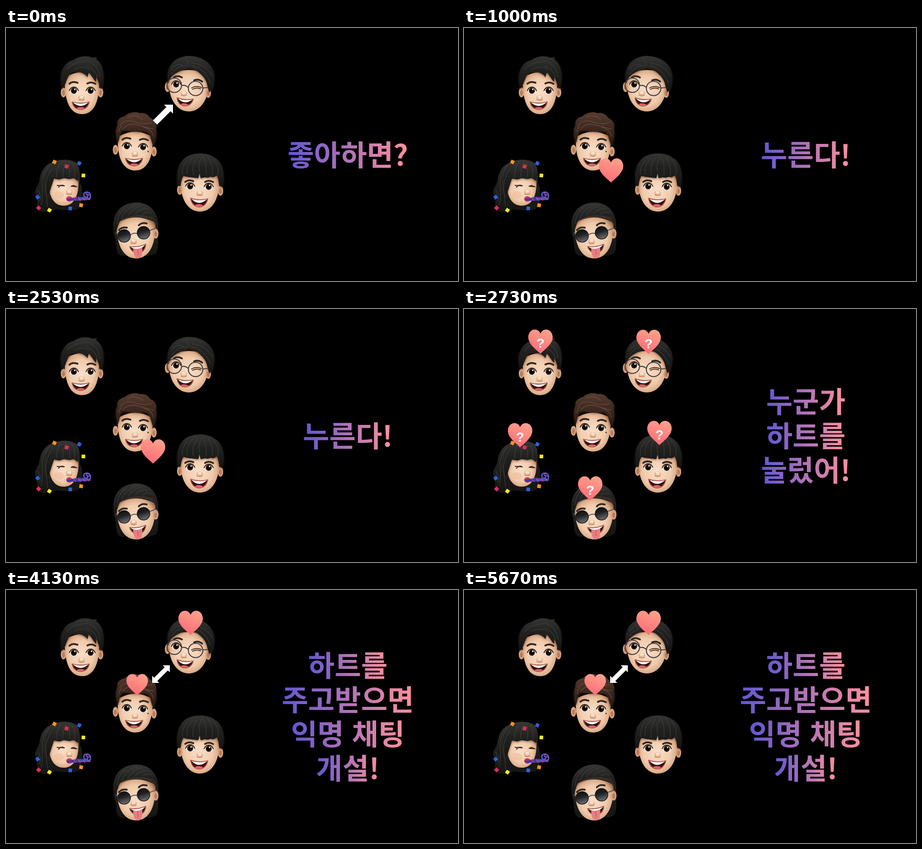
An HTML page that plays this animation: 999 px wide and 561 px high, repeating every 5740 ms.

```html
<!DOCTYPE html>
<html lang="ko">
<head>
<meta charset="utf-8">
<style>
html, body { margin: 0; width: 100%; height: 100%; overflow: hidden; background: #000; }
svg { display: block; width: 999px; height: 561px; }
.title { font: 900 63.5px "Noto Sans CJK KR", "Noto Sans CJK", sans-serif; text-anchor: middle; fill: url(#title); }
.mark { font: 700 30px "Liberation Sans", sans-serif; text-anchor: middle; fill: #fff; }
.fringe { filter: drop-shadow(0 2px 2px #6b3f2aa0); }
.line { fill: none; stroke-linecap: round; stroke-linejoin: round; }
</style>
</head>
<body>
<svg viewBox="0 0 999 561">
  <defs>
    <linearGradient id="title"><stop stop-color="#6156d2"/><stop offset="1" stop-color="#ff909c"/></linearGradient>
    <linearGradient id="heart" x1=".75" y1="0" x2=".35" y2="1"><stop stop-color="#ffa28c"/><stop offset="1" stop-color="#fd6a76"/></linearGradient>
    <radialGradient id="skin" cx=".48" cy=".5" r=".58"><stop stop-color="#f9dfc9"/><stop offset=".6" stop-color="#f0cbac"/><stop offset=".85" stop-color="#dbab87"/><stop offset="1" stop-color="#a87856"/></radialGradient>
    <linearGradient id="black" x2="0" y2="1"><stop stop-color="#353534"/><stop offset=".4" stop-color="#212120"/><stop offset="1" stop-color="#151514"/></linearGradient>
    <linearGradient id="brown" x2="0" y2="1"><stop stop-color="#563c30"/><stop offset=".5" stop-color="#3c281f"/><stop offset="1" stop-color="#251812"/></linearGradient>
    <linearGradient id="lens" x2=".3" y2="1"><stop stop-color="#0b0b0c"/><stop offset=".5" stop-color="#202123"/><stop offset="1" stop-color="#65676a"/></linearGradient>
  </defs>
  <g id="faces"></g>
  <g id="scenes"></g>
</svg>
<script>
const at = (x, y, body, turn = 0) => `<g transform="translate(${x} ${y}) rotate(${turn})">${body}</g>`;
const shape = (d, fill, cls = '') => `<path d="${d}" fill="${fill}" class="${cls}"/>`;
const line = (d, color, width) => `<path d="${d}" class="line" stroke="${color}" stroke-width="${width}"/>`;
const oval = (x, y, rx, ry, fill) => `<ellipse cx="${x}" cy="${y}" rx="${rx}" ry="${ry}" fill="${fill}"/>`;

const skin = (l, r, top, chin) => {
  const c = (l + r) / 2;
  return shape(`M${l} ${top}C${l - 2} ${chin - 20} ${c - 22} ${chin} ${c} ${chin}C${c + 22} ${chin} ${r + 2} ${chin - 20} ${r} ${top}Q${c} ${top - 24} ${l} ${top}Z`, 'url(#skin)');
};
const ear = (x, y) => oval(x, y, 6, 11, '#d6a27e') + oval(x, y + 1, 3, 6, '#b67b59');
const eye = (x, y) => at(x, y,
  oval(0, 0, 9.5, 7.5, '#fffaf3') + oval(0, 0, 6.8, 7, '#3a2417') + oval(0, 0, 4.6, 5, '#090706') +
  oval(2, -3, 1.7, 1.7, '#fff') + line('M-10 0Q-7 -8 0 -8T10 0', '#24170f', 2));
const brow = (x, y, turn, color = '#302822') => at(x, y, line('M-9 2Q-1 -4 9 1', color, 4), turn);
const nose = (x, y) => at(x, y,
  oval(0, 0, 7.5, 6, '#e4b591') + oval(0, -2, 4.5, 3.5, '#f9dfc9') + line('M-6 4Q0 7 6 4', '#bd8460', 1.6));
const mouth = (x, y, w, h, turn = 0, lip = '#a8604c') => at(x, y,
  `<path d="M${-w} 0Q0 ${.3 * h} ${w} 0C${.8 * w} ${1.33 * h} ${-.8 * w} ${1.33 * h} ${-w} 0Z" fill="#35110f" stroke="${lip}" stroke-width="2" stroke-linejoin="round"/>` +
  shape(`M${-.9 * w} ${.08 * h}Q0 ${.35 * h} ${.9 * w} ${.08 * h}Q0 ${.95 * h} ${-.9 * w} ${.08 * h}Z`, '#fff') +
  oval(0, .82 * h, .45 * w, .16 * h, '#d9636a'), turn);
const strands = (d, color = '#454543') => `<g opacity=".6">${line(d, color, 1.6)}</g>`;

const spiky = skin(130, 206, 110, 191) + ear(127, 143) + ear(209, 143) +
  shape('M125 135C121 120 119 98 128 87C134 76 142 73 150 71C160 63 178 60 190 66L201 65L198 69C207 74 213 84 214 95C217 110 214 128 210 136L206 125L200 108L199 120C194 114 188 104 183 98L180 109C174 100 162 96 146 96C138 103 134 116 131 124Z', 'url(#black)', 'fringe') +
  strands('M134 92Q150 74 184 74M150 92Q170 82 184 92M185 76Q204 84 208 110M178 84Q196 92 202 108') +
  brow(149, 121, -4) + brow(189, 122, 6) + eye(150, 139) + eye(187, 139) + nose(167, 155) + mouth(165, 164, 19, 17);

const glasses = skin(359, 449, 105, 185) + ear(357, 131) + ear(447, 144) +
  shape('M358 112C355 85 372 64 402 62C440 62 462 85 460 112C459 128 455 140 449 142L445 128C443 110 425 94 405 87C392 92 375 98 364 110L358 124Z', 'url(#black)', 'fringe') +
  strands('M404 84Q400 70 396 66M400 84Q380 82 366 102M392 84Q378 74 366 92M410 84Q438 88 452 122M412 78Q440 80 456 106') +
  brow(380, 108, 4) + brow(425, 116, 12) + eye(376, 125) +
  line('M410 133Q420 127 432 132M412 136Q421 131 430 135', '#4a2c1d', 2) + nose(393, 145) +
  mouth(396, 156, 18, 17, 5) +
  line('M388 127a16 16 0 1 0-32 0a16 16 0 1 0 32 0M435 134a16 16 0 1 0-32 0a16 16 0 1 0 32 0M388 128Q396 125 403 132M435 133L446 132', '#3e3b41', 2.2) +
  line('M361 117Q369 110 379 114M408 124Q416 117 426 121', '#aaa6ad', .8);

const quiff = skin(247, 324, 242, 316) + ear(242, 270) + ear(327, 274) +
  shape('M247 256C243 238 241 225 247 214C244 206 252 197 262 196C270 188 284 184 296 189C306 187 315 193 318 199C328 203 334 212 331 222C334 235 331 250 325 261L319 242C318 230 308 226 300 229C285 233 265 222 255 228C251 236 251 246 247 256Z', 'url(#brown)', 'fringe') +
  strands('M252 216Q264 201 284 208T322 210M258 224Q270 208 296 216T326 224M270 198Q284 190 302 202M250 230Q250 222 256 218M304 220Q322 224 326 240', '#7b5949') +
  brow(266, 245, -4) + brow(305, 247, 6) + eye(267, 262) + eye(303, 264) + nose(285, 279) +
  mouth(283, 289, 19, 17) + oval(314, 274, 1.4, 1.4, '#2a1912');

const bowl = skin(385, 472, 326, 407) + ear(384, 359) + ear(474, 361) +
  brow(405, 339, -2) + brow(449, 340, 4) +
  shape('M381 350C376 325 379 300 397 287C412 277 442 274 460 287C480 297 485 325 477 353L471 348C470 340 470 335 466 327L459 331L452 330L446 332L440 331L430 333L428 322L425 333L400 330L392 328C388 335 387 342 386 350Z', 'url(#black)', 'fringe') +
  strands('M428 318Q424 298 434 284M414 326Q410 302 424 286M400 324Q398 302 414 288M442 326Q444 300 436 286M456 326Q458 302 446 286M468 326Q472 304 458 292M390 324Q388 308 400 294') +
  eye(407, 351) + eye(448, 352) + nose(428, 366) + mouth(427, 378, 19, 19, 2, '#c1534f');

const confetti = [
  [107, 297, '#f79420', 25], [162, 300, '#2d62d8', 30], [134, 307, '#e42d50', 20],
  [171, 327, '#f8ec20', 5], [70, 375, '#2d62d8', -30], [72, 399, '#df2f5c', 45],
  [96, 404, '#f8ec20', 35], [142, 400, '#2d62d8', 5], [166, 393, '#f79420', 10]
].map(([x, y, color, turn]) => at(x, y, `<rect x="-4" y="-4" width="8" height="8" fill="${color}"/>`, turn)).join('');

const party =
  shape('M104 297C125 288 150 292 158 302C166 318 160 332 164 345C172 362 168 380 165 395C160 408 130 404 110 402C95 408 80 410 73 404C64 396 72 385 66 372C60 358 72 350 74 338C76 320 84 304 104 297Z', 'url(#black)') +
  skin(95, 160, 335, 394) +
  shape('M93 374C82 352 84 310 108 297C130 290 152 294 160 312C163 325 161 338 159 339L150 333L140 335L128 333L118 336L106 334C102 346 97 362 93 374Z', 'url(#black)', 'fringe') +
  strands('M96 306Q78 326 80 348T78 392M100 314Q86 336 88 358T92 396M112 330Q110 312 122 298M126 330Q124 312 132 298M140 330Q142 312 138 298M152 330Q154 314 146 300M70 360Q80 372 74 384') +
  line('M113 349L129 350M116 353Q122 346 129 350M144 351L157 352M144 351Q150 347 155 352', '#3a2118', 2) +
  nose(140, 364) + oval(117, 370, 11, 8, '#eeb99a80') + oval(140, 379, 7, 6, '#c9344c') +
  shape('M134 379L160 374L186 376L187 381L160 383L136 383Z', '#4437a5') +
  line('M161 379L185 379Q190 367 180 364Q171 364 172 371Q174 378 180 374Q183 369 178 369', '#4b57c4', 3.4) +
  line('M150 377l4 5M160 376l4 6M170 376l4 6M180 376l4 5M187 371l-4 -1M179 364l-1 3', '#dc3d70', 1.8) + confetti;

const lens = (x, y) => `<circle cx="${x}" cy="${y}" r="14" fill="url(#lens)" stroke="#171719" stroke-width="1.5"/>`;
const slick =
  shape('M238 440C236 410 254 388 288 387C318 387 336 408 336 440C337 470 338 492 331 500L318 505L255 505C240 500 246 480 240 462Z', 'url(#black)') +
  skin(245, 330, 432, 511) + ear(331, 456) +
  shape('M240 459C234 415 254 389 288 388C320 388 338 412 334 447C330 436 327 428 321 420C300 412 268 415 252 428C247 436 246 448 240 459Z', 'url(#black)', 'fringe') +
  strands('M256 422Q264 400 290 392M270 416Q278 400 300 394M286 413Q292 402 312 400M302 413Q310 406 322 410M246 434Q246 412 264 398M322 418Q330 426 331 438') +
  brow(258, 444, -14) + brow(302, 434, -10) + nose(282, 473) +
  mouth(291, 482, 18, 17, -8) +
  shape('M281 488Q291 492 301 486C302 500 300 511 292 511C284 511 281 500 281 488Z', '#e87c82') + line('M291 491L292 503', '#bd5560', 1.4) +
  line('M275 459Q282 453 290 456M317 449L331 444M247 458L243 454', '#55565a', 2) + lens(261, 461) + lens(304, 454);

const heart = (x, y, mark = '', size = 1) => at(x, y,
  `<path transform="scale(${size})" fill="url(#heart)" d="M0 27C-8 18 -27 6 -27 -10C-27 -20 -20 -27 -12.5 -27C-6 -27 -2 -23 0 -18C2 -23 6 -27 12.5 -27C20 -27 27 -20 27 -10C27 6 8 18 0 27Z"/>` +
  (mark && `<text class="mark" y="13.5">${mark}</text>`));
const title = (...rows) => rows.map((row, i) =>
  `<text class="title" x="755.5" y="${305 + 76 * (i - (rows.length - 1) / 2)}">${row}</text>`).join('');
const arrow = at(369, 170, shape('M0 0L-14 -14V-6.5H-56V6.5H-14V14Z', '#fff'), -45);
const twoWay = at(362, 167, shape('M0 0L-11 -11V-5H-44V-11L-55 0L-44 11V5H-11V11Z', '#fff'), -45);

const scenes = [
  [0, arrow + title('좋아하면?')],
  [1000, heart(325, 316) + title('누른다!')],
  [2730, [[169, 72.5], [408, 73], [124, 280], [432, 275], [279, 398]].map(([x, y]) => heart(x, y, '?')).join('') +
    title('누군가', '하트를', '눌렀어!')],
  [4130, heart(408, 73) + heart(290, 210, '', .88) + twoWay + title('하트를', '주고받으면', '익명 채팅', '개설!')]
];

document.getElementById('faces').innerHTML = spiky + glasses + quiff + bowl + party + slick;
const stage = document.getElementById('scenes');
stage.innerHTML = scenes.map(([, body]) => `<g>${body}</g>`).join('');

function draw() {
  const t = performance.now() % 5740;
  const current = scenes.filter(([start]) => start <= t).length - 1;
  [...stage.children].forEach((g, i) => g.setAttribute('display', i === current ? 'inline' : 'none'));
  requestAnimationFrame(draw);
}
draw();
</script>
</body>
</html>
```
